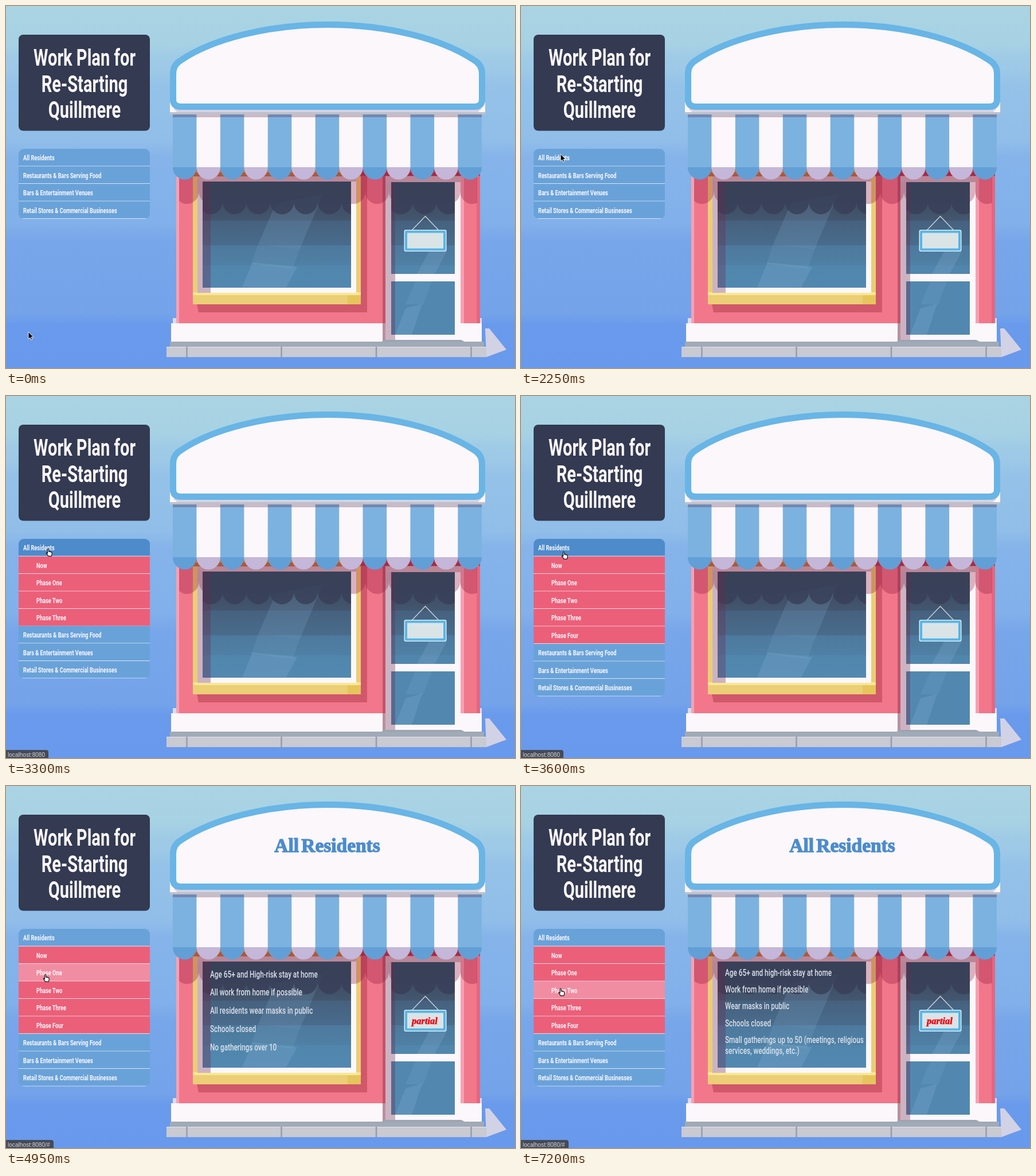
Write an HTML page that moves like this. It is 888 by 631 pixels and loops after 8000 ms.

```html
<!DOCTYPE html>
<html lang="en">
<head>
<meta charset="utf-8">
<title>Work Plan for Re-Starting Quillmere</title>
<style>
  html, body { margin: 0; width: 100%; height: 100%; overflow: hidden; }
  svg { display: block; }
  text { font-family: Roboto, sans-serif; font-weight: 600; fill: #fbf7fb; }
  .title { font-size: 41px; font-weight: 700; text-anchor: middle; }
  .item { font-size: 13px; }
  .rule { font-size: 16.6px; font-weight: 500; fill: #dbe1ea; }
  .sign { font: bold 33.4px "Liberation Serif", serif; word-spacing: -4px; fill: #4c8ccd; stroke: #4c8ccd; stroke-width: 1.3; text-anchor: middle; }
  .tag { font: italic bold 16.5px "Liberation Serif", serif; fill: #f8000c; stroke: #f8000c; stroke-width: .5; text-anchor: middle; }
  .status { font: 10.1px "Liberation Sans", sans-serif; fill: #d3d5da; }
</style>
</head>
<body>
<svg width="888" height="631" viewBox="0 0 888 631">
  <defs>
    <linearGradient id="sky" x2="0" y2="1">
      <stop offset="0" stop-color="#aad4e3"/><stop offset=".1" stop-color="#a7d2e4"/>
      <stop offset=".14" stop-color="#a0cbe6"/><stop offset=".18" stop-color="#9dc8e7"/>
      <stop offset=".22" stop-color="#94c2e8"/><stop offset=".37" stop-color="#91bee9"/>
      <stop offset=".42" stop-color="#85b3ea"/><stop offset=".6" stop-color="#82b0ea"/>
      <stop offset=".65" stop-color="#77a6ea"/><stop offset=".85" stop-color="#74a3ea"/>
      <stop offset=".88" stop-color="#6a9aec"/><stop offset="1" stop-color="#6999ec"/>
    </linearGradient>
    <linearGradient id="glass" gradientUnits="userSpaceOnUse" x1="0" y1="306" x2="0" y2="491">
      <stop offset=".1" stop-color="#3b475f"/><stop offset=".37" stop-color="#43576f"/>
      <stop offset=".37" stop-color="#46617f"/><stop offset=".6" stop-color="#496c8c"/>
      <stop offset=".6" stop-color="#4d799d"/><stop offset=".79" stop-color="#4f80a5"/>
      <stop offset=".79" stop-color="#5186ac"/><stop offset="1" stop-color="#5288b0"/>
    </linearGradient>
    <clipPath id="panes"><path d="M343 306H602V491H343ZM672 307H783V467H672Z"/></clipPath>
    <clipPath id="wall"><path d="M302 290H822V553H302Z"/></clipPath>
    <clipPath id="menuClip"><rect id="menuBox" x="22" y="249" width="229" rx="9"/></clipPath>
    <clipPath id="subClip"><rect id="subBox" x="22" y="279.5" width="229"/></clipPath>
  </defs>

  <rect width="888" height="631" fill="url(#sky)"/>

  <!-- ground and wall -->
  <path d="M836 562H843L873 599 838 612Z" fill="#d2d2e6"/>
  <path d="M291 544H830V556H291Z" fill="#dadbee"/>
  <path d="M297 286H827V553H297Z" fill="#f2778b"/>
  <path d="M297 296H302V553H297ZM793 296H799V553H793Z" fill="#f6a1b3"/>
  <path d="M821 296H827V553H821Z" fill="#e5677e"/>
  <path d="M297 284H827V296H297Z" fill="#b2364b"/>
  <path d="M288 553H830V585H288Z" fill="#fbf7fb"/>
  <path d="M286 585H834V595H286Z" fill="#a1aab7"/>
  <path d="M280 594H838V612H280Z" fill="#c9cad2"/>
  <path d="M280 594.5H838" stroke="#e4e5ec"/>
  <path d="M315.500 594V612M480.500 594V612M646 594V612M811.500 594V612" stroke="#959dac" stroke-width="2.500"/>

  <!-- window frame -->
  <path d="M332 515 336 534H630V296H611Z" fill="#d1576b"/>
  <path d="M326 284H619V520H326Z" fill="#ebce75"/>
  <path d="M326 284H619V297H326Z" fill="#b77a42"/>
  <path d="M326 499H619V504H326Z" fill="#fbe793"/>
  <path d="M596 504H619V520H596Z" fill="#e6c55c"/>
  <path d="M334 297H611V500H334Z" fill="#fbf7fb"/>

  <!-- door frame -->
  <path d="M657 296H662V553H657Z" fill="#c1556b"/>
  <path d="M657 553H662V583H657Z" fill="#b9909f"/>
  <path d="M662 297H793V583H662Z" fill="#fbf7fb"/>
  <path d="M658 582H794L800 585H656Z" fill="#9ca4b1"/>

  <path id="wallShade" clip-path="url(#wall)" fill="#8c1032" opacity=".3"/>
  <path d="M334 297H611V306H334ZM662 297H793V307H662Z" fill="#b98798"/>

  <path d="M343 306H602V491H343ZM672 307H783V467H672ZM672 480H783V573H672Z" fill="url(#glass)"/>
  <g fill="#8fb8dc">
    <path d="M471 344 553 328 512 425 440 415Z" opacity=".17"/>
    <path d="M440 415 512 425 500 458 428 450Z" opacity=".12"/>
    <path d="M430 447 508 455 489 490H412Z" opacity=".22"/>
    <path d="M738 428H769L748 467H717Z" opacity=".2"/>
    <path d="M714 480H743L728 520H697Z" opacity=".12"/>
    <path d="M697 527 726 519 708 573H679Z" opacity=".22"/>
  </g>
  <path id="glassShade" clip-path="url(#panes)" fill="#394059" opacity=".85"/>
  <path d="M334 306H357V500H334ZM662 307H679V582H662Z" fill="#6b2a4c" opacity=".33"/>

  <!-- door tag -->
  <path d="M708 391 731.500 366.500 755 391" fill="none" stroke="#ccd6e1" stroke-width="1.300"/>
  <rect x="694.500" y="390" width="74" height="38" rx="3" fill="#d9edf4"/>
  <rect x="696" y="391.500" width="71" height="35" rx="2" fill="#58b5e5"/>
  <rect x="700" y="395.500" width="63" height="27" fill="#dae4e7"/>

  <g id="awning"></g>
  <path d="M291 188H830V194H291Z" fill="#5a2846" opacity=".3"/>

  <!-- shop sign -->
  <path d="M286 168H836V187H286Z" fill="#fbf7fb"/>
  <path d="M292 179H830L822 186H300Z" fill="#d8d2e2"/>
  <path d="M286 185H836V189H286Z" fill="#bcc1cc"/>
  <path d="M305 175.500H817Q830.500 175.500 830.500 163V118Q830.500 102 816 94C762 58 667 32.500 561 32.500S360 58 306 94Q291.500 102 291.500 118V163Q291.500 175.500 305 175.500Z"
    fill="#fbf7fb" stroke="#68b5e6" stroke-width="11"/>

  <rect x="22" y="50" width="229" height="167.500" rx="8" fill="#333a51"/>
  <g id="title"></g>
  <g clip-path="url(#menuClip)">
    <g id="topItem"></g>
    <g id="subItems" clip-path="url(#subClip)"></g>
    <g id="lowItems"></g>
  </g>

  <g id="notice">
    <text class="sign" x="560.500" y="115">All Residents</text>
    <text class="tag" x="730.500" y="415">partial</text>
  </g>
  <g id="phaseOne"></g>
  <g id="phaseTwo"></g>

  <g id="statusBar">
    <path id="statusBox" fill="#464a56"/>
    <text id="statusText" class="status" x="3" y="628.500"></text>
  </g>
  <path id="arrow" d="M0 0V12.500L2.900 9.900 4.800 14 6.800 13.100 5 9.100H8.800Z" stroke="#fff" stroke-width=".9"/>
  <path id="hand" d="M3 8.200V1.600a1.100 1.100 0 0 1 2.200 0V5.200q1.800-.9 2 .4 1.700-.7 1.800.5 1.600-.4 1.600 1V9.600q0 1.600-1 3.600H4.200Q3.400 11.500 1 8.600 .4 7.200 1.800 7.200Z"
    fill="#fff" stroke="#111" stroke-width="1.200"/>
</svg>

<script>
const $ = id => document.getElementById(id);
const CONDENSE = 0.71;
const ROW = 30.5, MENU_TOP = 249;
const BLUE = '#69a2d9', BLUE_HOVER = '#4d8bcb', PINK = '#ec5f79', PINK_HOVER = '#f18da2';

function add(parent, tag, attrs, content = '') {
  const node = document.createElementNS('http://www.w3.org/2000/svg', tag);
  for (const key in attrs) node.setAttribute(key, attrs[key]);
  node.textContent = content;
  return parent.appendChild(node);
}

// All sans text shares one narrow style.
const narrowText = (parent, cls, x, y, content) =>
  add(parent, 'text', { class: cls, transform: `translate(${x} ${y}) scale(${CONDENSE} 1)` }, content);

const scallops = (x, top, bottom, width, depth, count) =>
  `M${x} ${top}V${bottom}` + `a${width / 2} ${depth} 0 0 0 ${width} 0`.repeat(count) + `V${top}Z`;

// Awning and its shadows
const STRIPE = 539 / 13;
for (let i = 0; i < 13; i++) {
  const x = 291 + i * STRIPE, white = i % 2;
  add($('awning'), 'path', { d: scallops(x, 281, 281.5, STRIPE, 21, 1), fill: white ? '#c4b7d9' : '#629fd6' });
  add($('awning'), 'rect', { x, y: 188, width: STRIPE, height: 93, fill: white ? '#fbf7fb' : '#7cb2e0' });
}
$('wallShade').setAttribute('d', scallops(295, 290, 324, STRIPE, 21, 13));
$('glassShade').setAttribute('d', scallops(295, 290, 342, STRIPE, 21, 13));

['Work Plan for', 'Re-Starting', 'Quillmere'].forEach((line, i) =>
  narrowText($('title'), 'title', 137, 104 + i * 45.7, line));

// Menu
function menuItem(parent, row, label, x, fill) {
  const y = MENU_TOP + row * ROW;
  const box = add(parent, 'rect', { x: 22, y, width: 229, height: ROW, fill });
  add(parent, 'rect', { x: 22, y: y + 29.7, width: 229, height: 1, fill: '#f4f4fa' });
  narrowText(parent, 'item', x, y + 20.3, label);
  return box;
}
const residents = menuItem($('topItem'), 0, 'All Residents', 30, BLUE);
const phases = ['Now', 'Phase One', 'Phase Two', 'Phase Three', 'Phase Four']
  .map((label, i) => menuItem($('subItems'), i + 1, label, 53, PINK));
['Restaurants & Bars Serving Food', 'Bars & Entertainment Venues', 'Retail Stores & Commercial Businesses']
  .forEach((label, i) => menuItem($('lowItems'), i + 1, label, 30, BLUE));

// Window notices
['Age 65+ and High-risk stay at home', 'All work from home if possible',
  'All residents wear masks in public', 'Schools closed', 'No gatherings over 10']
  .forEach((line, i) => narrowText($('phaseOne'), 'rule', 356, 333.5 + i * 31.8, line));
['Age 65+ and high-risk stay at home', 'Work from home if possible', 'Wear masks in public',
  'Schools closed', 'Small gatherings up to 50 (meetings, religious', 'services, weddings, etc.)']
  .forEach((line, i) => narrowText($('phaseTwo'), 'rule', 356, i < 5 ? 330.5 + i * 29.4 : 466.5, line));

// Each step: start time, then its values
const pointer = [
  [0, 39, 568], [1050, 54, 451], [1200, 48, 322], [1350, 57, 270], [1500, 64.5, 263],
  [1650, 67, 257.5], [1800, 69, 257], [2250, 69, 258],
  [3000, 69, 265], [3150, 69.5, 266], [3600, 70.5, 271], [3750, 69, 285], [3900, 69, 296],
  [4050, 66, 319], [4200, 65.5, 327.5], [4350, 65, 329], [4500, 64.5, 328],
  [6450, 64.5, 341], [6600, 65, 347], [6750, 65, 352], [6900, 65, 352.5]
];
const opening = [[0, 0], [3150, 71], [3300, 121.3], [3450, 148], [3600, 152.5]];
const hovered = [[0, -2], [3000, -1], [3900, 0], [4200, 1], [6600, 2]];
const stepAt = (steps, t) => steps.findLast(step => step[0] <= t).slice(1);
const show = (id, visible) => $(id).setAttribute('visibility', visible ? 'visible' : 'hidden');

function draw() {
  const t = performance.now() % 8000;

  const [open] = stepAt(opening, t);
  $('menuBox').setAttribute('height', 4 * ROW + open);
  $('subBox').setAttribute('height', open);
  $('lowItems').setAttribute('transform', `translate(0 ${open})`);

  const [hover] = stepAt(hovered, t);
  residents.setAttribute('fill', hover === -1 ? BLUE_HOVER : BLUE);
  phases.forEach((box, i) => box.setAttribute('fill', i === hover ? PINK_HOVER : PINK));

  show('notice', t >= 4950);
  show('phaseOne', t >= 4950 && t < 7200);
  show('phaseTwo', t >= 7200);

  const inMenu = t >= 3900;
  show('statusBar', t >= 3300);
  $('statusBox').setAttribute('d', `M0 617H${inMenu ? 79 : 70}q4 0 4 4V631H0Z`);
  $('statusText').textContent = 'localhost:8080' + (inMenu ? '/#' : '');

  const [x, y] = stepAt(pointer, t);
  show('arrow', t < 3000);
  show('hand', t >= 3000);
  $(t < 3000 ? 'arrow' : 'hand').setAttribute('transform', `translate(${x} ${y})`);

  requestAnimationFrame(draw);
}
draw();
</script>
</body>
</html>
```
